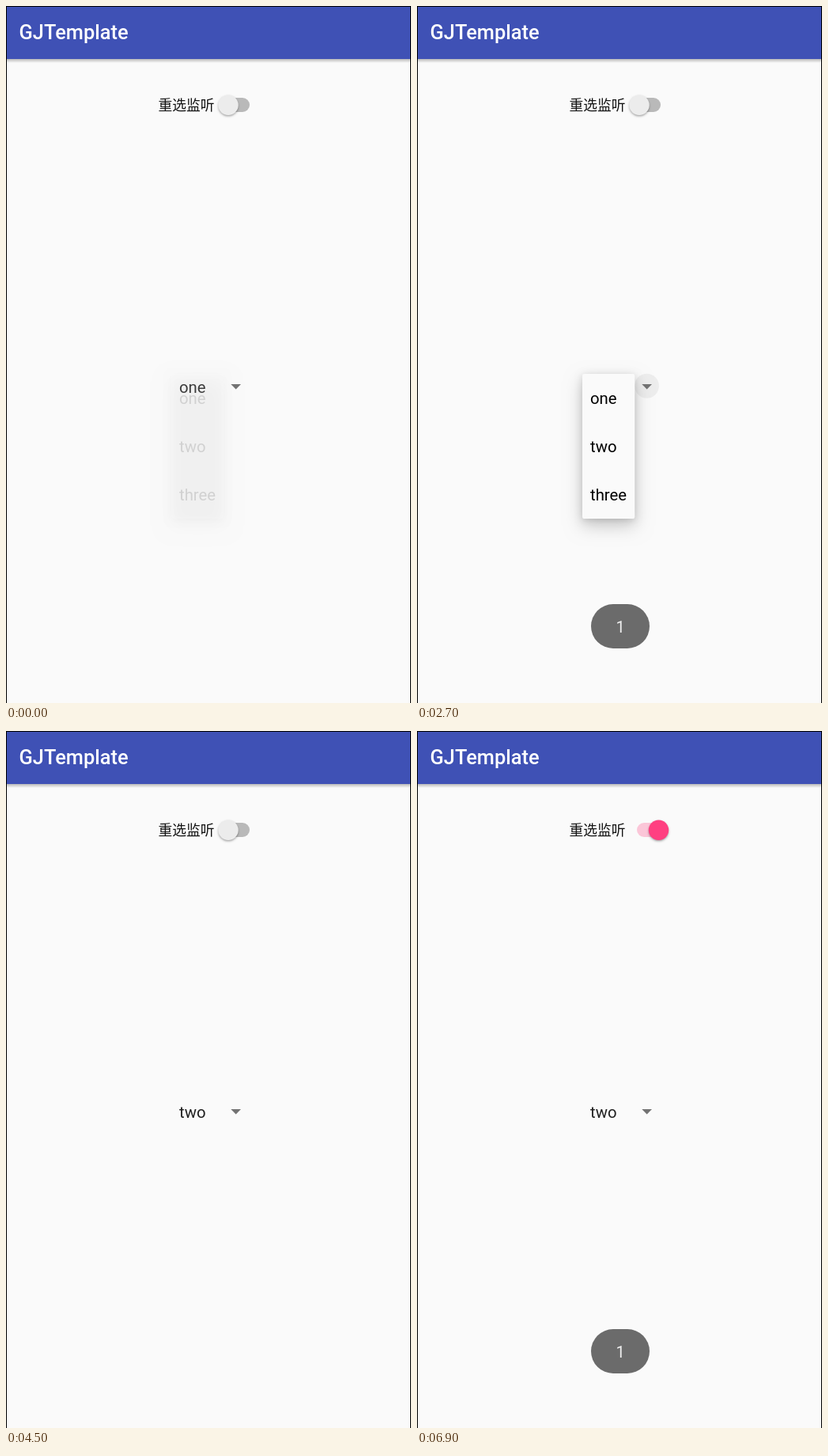
An HTML page with a canvas for the animation above (8000 ms loop, 512 by 881 pixels).

```html
<!DOCTYPE html>
<html lang="zh-CN">
<head>
<meta charset="utf-8">
<title>Spinner demo</title>
<style>
html, body { margin: 0; width: 100%; height: 100%; overflow: hidden; background: #fafafa; }
canvas { display: block; width: 512px; height: 881px; }
</style>
</head>
<body>
<canvas id="stage" width="512" height="881"></canvas>
<script>
const ctx = document.getElementById('stage').getContext('2d');
const LOOP = 8000, STEP = 100;
const BG = '#fafafa', PINK = '#ff4081';
const ROBOTO = 'Roboto, sans-serif';
const CJK = '"Noto Sans CJK SC", "Noto Sans CJK", sans-serif';
const ITEMS = ['one', 'two', 'three'];
const LIST = { x: 209, y: 465, w: 66.3, h: 183, row: 61 };
// Each use of the drop-down: when it opens and when an item is pressed.
const USES = [{ open: 750, press: 1500 }, { open: 2400, press: 3300 }, { open: 5600, press: 6500 }];

const clamp = v => Math.max(0, Math.min(1, v));
const mix = (a, b, p) => a + (b - a) * p;

// cubic-bezier(0.4, 0, 0.2, 1)
function ease(t) {
  if (t <= 0) return 0;
  if (t >= 1) return 1;
  let lo = 0, hi = 1;
  for (let i = 0; i < 24; i++) {
    const s = (lo + hi) / 2, r = 1 - s;
    if (1.2 * s * r * r + 0.6 * s * s * r + s * s * s < t) lo = s; else hi = s;
  }
  return lo * lo * (3 - 2 * lo);
}

function text(str, x, y, font, color, align = 'left') {
  ctx.font = font;
  ctx.fillStyle = color;
  ctx.textAlign = align;
  ctx.fillText(str, x, y);
}

function box(x, y, w, h, r, color) {
  ctx.fillStyle = color;
  ctx.beginPath();
  ctx.roundRect(x, y, w, h, r);
  ctx.fill();
}

function disc(x, y, r, color) {
  ctx.fillStyle = color;
  ctx.beginPath();
  ctx.arc(x, y, r, 0, Math.PI * 2);
  ctx.fill();
}

// Paints only the shadow of a shape; the shape itself lies off the stage.
function shadow(dy, blur, alpha, paint) {
  ctx.save();
  ctx.translate(-2000, 0);
  ctx.shadowColor = `rgba(0,0,0,${alpha})`;
  ctx.shadowBlur = blur;
  ctx.shadowOffsetX = 2000;
  ctx.shadowOffsetY = dy;
  paint();
  ctx.restore();
}

function appBar() {
  const fade = ctx.createLinearGradient(0, 67, 0, 72);
  fade.addColorStop(0, 'rgba(0,0,0,0.26)');
  fade.addColorStop(1, 'rgba(0,0,0,0)');
  ctx.fillStyle = fade;
  ctx.fillRect(0, 67, 512, 5);
  ctx.fillStyle = '#3f51b5';
  ctx.fillRect(0, 0, 512, 67);
  text('GJTemplate', 16.5, 42, `500 25.4px ${ROBOTO}`, '#fff');
}

function toggle(t) {
  text('重选监听', 192.5, 131.7, `17.8px ${CJK}`, '#111');
  const p = ease((t - 4650) / 250);
  const x = mix(281, 305.5, p), y = 125.2;
  const q = clamp((t - 4650) / 250);
  box(278, 116, 30, 18, 9, p > 0 ? 'rgba(255,64,129,0.28)' : 'rgba(0,0,0,0.26)');
  if (q > 0 && q < 1) {
    disc(x, y, 25.5 * Math.min(1, q * 1.7), `rgba(255,64,129,${0.2 * Math.sin(Math.PI * q)})`);
  }
  shadow(1.5, 3, 0.4, () => disc(x, y, 12.4, '#000'));
  disc(x, y, 12.7, p > 0 ? PINK : '#ececec');
}

function spinner(t, use) {
  if (use && t < use.press + 100) {
    const fade = clamp((t - use.open - 100) / 250);
    disc(290.5, 480.3, 15.5, `rgba(0,0,0,${mix(0.07, 0.045, fade)})`);
  }
  text(t < 1600 ? 'one' : 'two', 219, 488.5, `20.3px ${ROBOTO}`, '#212121');
  ctx.fillStyle = '#737373';
  ctx.beginPath();
  ctx.moveTo(284.3, 478);
  ctx.lineTo(297, 478);
  ctx.lineTo(290.65, 484.4);
  ctx.fill();
}

// The list slides out of the spinner while its clip grows around the centre.
function popup(p, alpha, press) {
  const { x, y, w, h, row } = LIST;
  const rest = 1 - p;
  const dx = 10.7 * rest, dy = -75.5 * rest, cut = 76 * rest;
  const left = x + dx, top = Math.max(y - 0.5, y + dy + cut), height = h - cut * 2;
  const panel = () => box(left, top, w, height, p < 1 ? 0 : 2, BG);

  ctx.save();
  ctx.globalAlpha = alpha;
  shadow(9, 22, 0.2, panel);
  shadow(2, 8, 0.14, panel);
  panel();
  ctx.beginPath();
  ctx.rect(left, top, w, height);
  ctx.clip();
  if (press > 0) {
    ctx.fillStyle = `rgba(0,0,0,${press})`;
    ctx.fillRect(left, y + dy + row, w, row);
  }
  ITEMS.forEach((item, i) =>
    text(item, left + 10, y + dy + 38.3 + i * row, `20.3px ${ROBOTO}`, '#000'));
  ctx.restore();
}

function drawPopup(t, use) {
  if (t < 800) return popup(1, 0.13, 0);
  if (!use) return;
  const age = t - use.press;
  const shown = clamp((t - use.open) / 100);
  const gone = age <= 0 ? 0 : age <= 100 ? 0.13 : 0.63;
  popup(ease((t - use.open) / 250), shown * (1 - gone), age < 0 ? 0 : age < 100 ? 0.06 : 0.1);
}

function toastAlpha(t) {
  if (t >= 6500) return clamp((t - 6550) / 350);
  if (t >= 4500) return 0;
  if (t > 3600) return Math.max(0.14, 1 - (t - 3600) / 340);
  return clamp((t - 1650) / 350);
}

function toast(t) {
  const alpha = toastAlpha(t);
  if (!alpha) return;
  ctx.save();
  ctx.globalAlpha = alpha;
  box(220, 756, 74, 56, 28, '#6b6b6b');
  text('1', 257, 791.7, `20px ${ROBOTO}`, '#f0f0f0', 'center');
  ctx.restore();
}

function border() {
  ctx.fillStyle = '#000';
  ctx.fillRect(0, 0, 512, 1);
  ctx.fillRect(0, 0, 1, 881);
  ctx.fillRect(511, 0, 1, 881);
}

function draw(now) {
  const t = Math.floor((now % LOOP) / STEP) * STEP;
  const use = USES.find(u => t >= u.open && t < u.press + 300);
  ctx.fillStyle = BG;
  ctx.fillRect(0, 0, 512, 881);
  appBar();
  toggle(t);
  spinner(t, use);
  drawPopup(t, use);
  toast(t);
  border();
}

let start;
function tick(now) {
  if (start === undefined) start = now;
  draw(now - start);
  requestAnimationFrame(tick);
}
draw(0);
requestAnimationFrame(tick);
</script>
</body>
</html>
```
